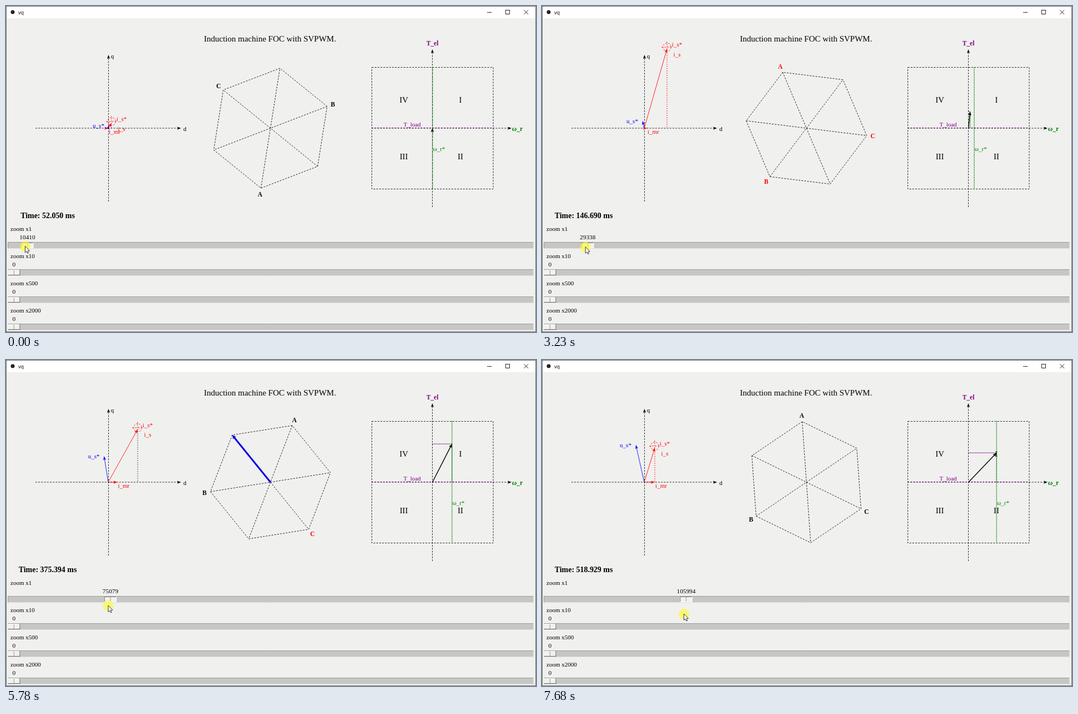
These frames come from a looping animation (954x587 px, 7.73 s). An HTML page with a canvas:

```html
<!DOCTYPE html>
<html lang="en">
<head>
<meta charset="utf-8">
<title>Induction machine FOC</title>
<style>
  html, body { margin: 0; width: 100%; height: 100%; overflow: hidden; background: #f0f0ef; }
  canvas { display: block; }
</style>
</head>
<body>
<canvas id="stage" width="954" height="587"></canvas>
<script>
const g = document.getElementById('stage').getContext('2d');
const LOOP = 7730, STEP = 50, LAST_STEP = 140;
const TAU = Math.PI * 2, RAD = Math.PI / 180;
const SAMPLES_PER_PIXEL = 315.459, MS_PER_SAMPLE = 0.00499999;
const RED = '#f00', BLUE = '#00f', GREEN = '#008000', PURPLE = '#800080', BLACK = '#000';
const DASH = [3, 2.2], DOTS = [1.5, 1.5], THIN = 0.85;

const clamp = (x, lo, hi) => Math.max(lo, Math.min(hi, x));

// Piecewise linear curve through [x, y] points
const curve = (...points) => x => {
  let i = 0;
  while (i < points.length - 2 && x > points[i + 1][0]) i++;
  const [[x0, y0], [x1, y1]] = points.slice(i);
  return y0 + clamp((x - x0) / (x1 - x0), 0, 1) * (y1 - y0);
};

// The slider is dragged in redraws of 50 ms, with four rests: start, length
const rests = [[50, 50], [300, 350], [1100, 150], [1750, 110]];
function stepAt(t) {
  const rested = rests.reduce((sum, [start, length]) => sum + clamp(t - start, 0, length), 0);
  return Math.min(LAST_STEP, Math.floor((t - rested + 0.5) / STEP));
}

// Slider and plotted position, in slider pixels; the plot trails the slider a little
const sliderAt = curve([0, 33], [29, 56], [51, 93], [84, 187], [102, 238], [125, 290], [140, 336]);
const lagAt = curve([0, 0], [29, 2], [51, 0], [84, 2], [102, 0], [125, 3], [140, 7]);

// Machine state at plotted position m
const START = 33, BRAKE = 205;
const statorAngle = curve([START, -99], [54, -698], [93, -1327], [185, -2234], [238, -2811], [287, -3513], [329, -4226]);
const refD = curve([START, 6], [54, 45], [93, 41], [238, 53], [287, 13], [329, 19]);
const refQ = m => Math.min(146, 12 + 12 * (m - START), Math.max(65, 146 - 1.45 * (m - BRAKE)));
const voltD = curve([START, 1], [54, -17], [93, -3], [287, -9], [329, -15]);
const voltQ = curve([START, 5], [54, 17], [93, 13], [185, 27], [287, 65], [329, 67]);
const fluxCurrent = m => Math.min(19, 0.08 * (m - START));
const refSpeed = m => Math.max(0, 0.1708 * (m - 31.7));
const rotorSpeed = m => Math.min(refSpeed(m), 0.00088 * (m - START) ** 2);
const torque = m => fluxCurrent(m) * refQ(m) / 23.4;
const TRACKING_ERROR = 3;

function line(x1, y1, x2, y2, color = BLACK, dash = [], width = THIN) {
  g.strokeStyle = color;
  g.lineWidth = width;
  g.setLineDash(dash);
  g.beginPath();
  g.moveTo(x1, y1);
  g.lineTo(x2, y2);
  g.stroke();
  g.setLineDash([]);
}

function disc(x, y, r, color) {
  g.fillStyle = color;
  g.beginPath();
  g.arc(x, y, r, 0, TAU);
  g.fill();
}

function polygon(points, color) {
  g.fillStyle = color;
  g.beginPath();
  points.forEach(([x, y]) => g.lineTo(x, y));
  g.closePath();
  g.fill();
}

function arrow(x1, y1, x2, y2, color = BLACK, dash = [], width = THIN) {
  const a = Math.atan2(y2 - y1, x2 - x1), c = Math.cos(a), s = Math.sin(a);
  const half = 2.2 + width / 2;
  const at = (back, side) => [x2 - back * c - side * s, y2 - back * s + side * c];
  if (Math.hypot(x2 - x1, y2 - y1) > 5) line(x1, y1, ...at(5, 0), color, dash, width);
  polygon([at(0, 0), at(7, half), at(5.5, 0), at(7, -half)], color);
}

function text(s, x, y, { size = 11, color = BLACK, bold = false, align = 'center' } = {}) {
  g.font = `${bold ? 'bold ' : ''}${size}px "Liberation Serif", "Times New Roman", serif`;
  g.fillStyle = color;
  g.textAlign = align;
  g.fillText(s, x, y + size * 0.33);
}

function drawWindow() {
  g.fillStyle = '#f0f0ef';
  g.fillRect(0, 0, 954, 587);
  g.fillStyle = '#fff';
  g.fillRect(0, 0, 954, 22);
  disc(12, 11, 3.5, '#222');
  g.font = '9px "Open Sans", sans-serif';
  g.textAlign = 'left';
  g.fillStyle = BLACK;
  g.fillText('vq', 22, 14.5);
  line(866, 11.5, 874, 11.5);
  g.strokeRect(899.5, 7.5, 7, 7);
  line(932.5, 7.5, 940, 15);
  line(940, 7.5, 932.5, 15);
  g.strokeStyle = '#555';
  g.strokeRect(0.5, 0.5, 953, 586);
}

// Bevelled box: light and shade give the upper left and lower right edges
function bevel(x, y, w, h, fill, light, shade) {
  g.fillStyle = fill;
  g.fillRect(x, y, w, h);
  line(x, y + 0.5, x + w, y + 0.5, light, [], 1);
  line(x + 0.5, y, x + 0.5, y + h, light, [], 1);
  line(x, y + h - 0.5, x + w, y + h - 0.5, shade, [], 1);
  line(x + w - 0.5, y, x + w - 0.5, y + h, shade, [], 1);
}

const handleCenter = value => 14.4 + value * 0.002312;

function drawSlider(row, label, value, active) {
  const y = 425 + 49 * row, center = handleCenter(value);
  text(label, 8, y - 23.5, { align: 'left' });
  text(value, center, y - 8.5, { size: 11.3 });
  bevel(3, y, 947, 12, '#c6c6c5', '#9c9c9c', '#dedede');
  bevel(center - 11, y + 1, 22, 10, '#f1f1f0', ...(active ? ['#888', '#fff'] : ['#fff', '#696969']));
  line(center, y + 2, center, y + 10, '#999', [], 1);
}

function drawCurrents(m) {
  const ox = 184, oy = 220;
  const x = ox + refD(m), y = oy - refQ(m), tipY = y + TRACKING_ERROR;
  arrow(53, oy, 315, oy, BLACK, DASH);
  arrow(ox + 0.5, 352, ox + 0.5, 88, BLACK, DASH);
  text('d', 322, 221);
  text('q', 191.5, 90);

  line(x, y - 10, x, oy, m % 4 > 1 ? '#333' : RED, [2, 2]);
  line(x - 10, y, x + 10, y, RED, DASH);
  g.setLineDash(DASH);
  g.beginPath();
  g.arc(x, y, 7.3, 0, TAU);
  g.stroke();
  arrow(ox, oy, x, tipY, RED);
  text('i_s*', x + 18, y - 4.5, { color: RED });
  text('i_s', x + 18, tipY + 10, { color: RED });

  const flux = ox + fluxCurrent(m);
  arrow(ox, oy, flux, oy, RED);
  text('i_mr', flux + 11.5, 226, { color: RED });
  const ux = ox + voltD(m), uy = oy - voltQ(m);
  arrow(ox, oy, ux, uy, BLUE);
  text('u_s*', ux - 18.5, uy, { color: BLUE });
}

function drawInverter(m) {
  const ox = 476, oy = 220, radius = 109.3, base = statorAngle(m);
  const point = (deg, r) => [ox + r * Math.cos(deg * RAD), oy - r * Math.sin(deg * RAD)];
  for (let i = 0; i < 6; i++) {
    const a = base + 60 * i, p = point(a, radius);
    line(...p, ...point(a + 60, radius), BLACK, DASH);
    if (i < 3) line(...p, ...point(a + 180, radius), BLACK, DASH);
  }

  // Each leg compares its duty with a triangular carrier
  const ud = voltD(m), uq = voltQ(m), uAngle = Math.atan2(uq, ud);
  const phase = 0.462929 * (m - 287) + 0.015;
  const carrier = Math.abs(2 * (phase - Math.floor(phase)) - 1);
  const amplitude = Math.hypot(ud, uq) / radius * 2 / 3;
  let vx = 0, vy = 0, legsOn = 0;
  ['A', 'B', 'C'].forEach((name, i) => {
    const a = base + 120 * i;
    const on = 0.5 + amplitude * Math.cos(uAngle - a * RAD) > carrier;
    if (on) {
      vx += Math.cos(a * RAD);
      vy -= Math.sin(a * RAD);
      legsOn++;
    }
    text(name, ...point(a, radius * 1.1), { size: 11.5, bold: true, color: on ? BLACK : RED });
  });
  if (legsOn % 3) arrow(ox, oy, ox + vx * radius, oy + vy * radius, '#0000e6', [], 3);
}

function drawQuadrants(m) {
  const ox = 767.5, oy = 220;
  const refX = ox + refSpeed(m), x = ox + rotorSpeed(m), y = oy - torque(m);
  g.strokeStyle = BLACK;
  g.lineWidth = THIN;
  g.setLineDash(DASH);
  g.strokeRect(658.5, 110.5, 218.5, 219);
  arrow(658, oy, 910, oy, BLACK, DASH);
  arrow(ox, 362, ox, 78, BLACK, DASH);
  text('T_el', 767.5, 67, { size: 11.5, bold: true, color: PURPLE });
  text('ω_r', 920.5, 221, { size: 11.5, bold: true, color: GREEN });
  ['I', 'II', 'III', 'IV'].forEach((name, i) =>
    text(name, i < 2 ? 818 : 716, i % 3 ? 271 : 169, { size: 14.7 }));

  line(658, 219.5, 877, 219.5, PURPLE, DASH, 1);
  text('T_load', 731, 213, { color: PURPLE });
  line(refX, 110, refX, 329, GREEN, DOTS, 1.5);
  text('ω_r*', refX + 0.8, 257.5, { color: GREEN, align: 'left' });
  line(ox, y, x, y, PURPLE, DOTS, 1.5);
  line(x, y, x, oy, GREEN, DOTS, 1.5);
  arrow(ox, oy + 0.2, x, y, BLACK, [], 1.4);
}

function drawCursor(x, y) {
  disc(x, y + 0.5, 9.5, 'rgba(255, 250, 50, 0.65)');
  const outline = [[0, 0], [0, 11.5], [2.6, 9.2], [4.4, 13], [6.2, 12.2], [4.6, 8.5], [8, 8.2]];
  polygon(outline.map(([dx, dy]) => [x + dx, y + dy]), '#fff');
  g.strokeStyle = '#222';
  g.lineWidth = 0.9;
  g.stroke();
}

function draw(t) {
  const step = stepAt(t), n = Math.round(sliderAt(step)), m = n - Math.round(lagAt(step));
  const value = Math.round(n * SAMPLES_PER_PIXEL);
  const time = Math.round(m * SAMPLES_PER_PIXEL) * MS_PER_SAMPLE;
  drawWindow();
  text('Induction machine FOC with SVPWM.', 475.2, 59.5, { size: 15 });
  drawCurrents(m);
  drawInverter(m);
  drawQuadrants(m);
  text(`Time: ${time.toFixed(3)} ms`, 75, 377, { size: 13.95, bold: true });
  [1, 10, 500, 2000].forEach((zoom, i) => drawSlider(i, `zoom x${zoom}`, i ? 0 : value, !i));
  drawCursor(handleCenter(value) - 4, 432.5 + 24.5 * (step / LAST_STEP) ** 3);
}

let startTime;
function tick(now) {
  startTime ??= now;
  draw((now - startTime) % LOOP);
  requestAnimationFrame(tick);
}
requestAnimationFrame(tick);
</script>
</body>
</html>
```
